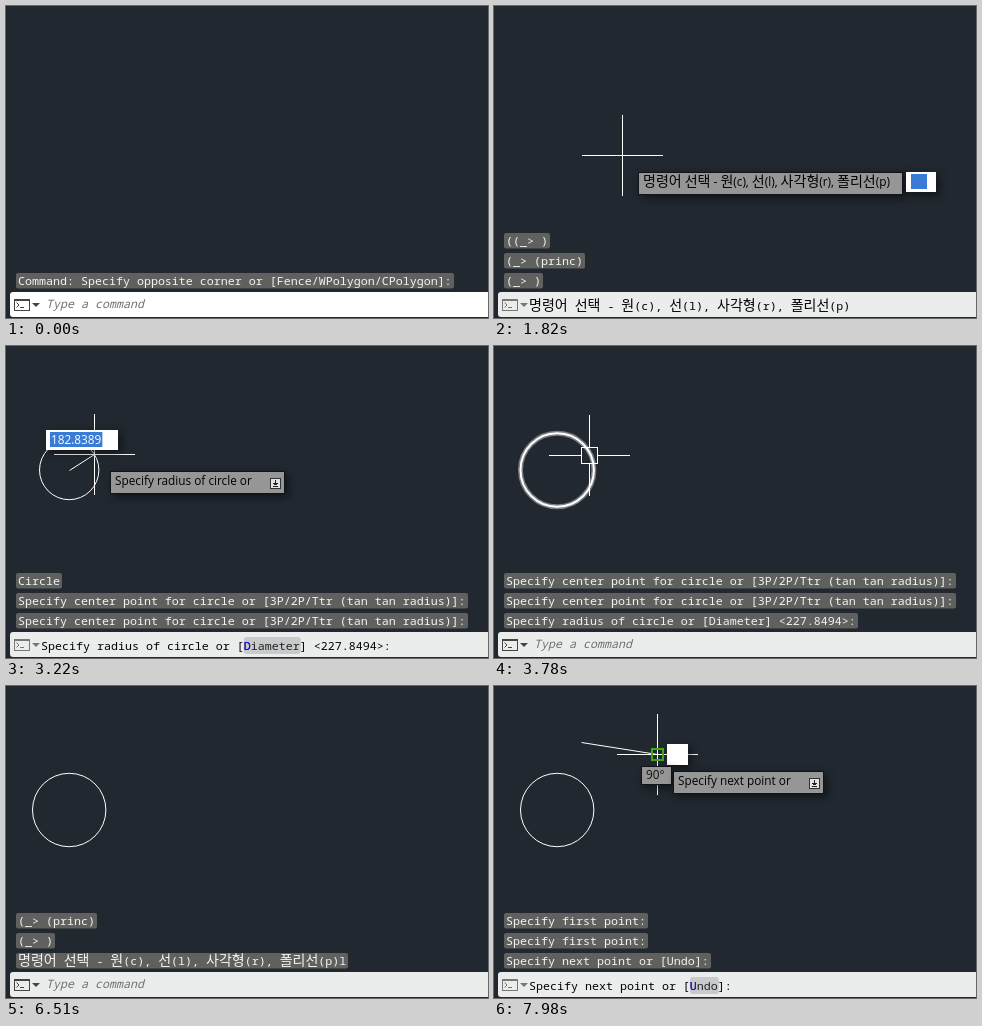
An HTML page with a canvas that plays this animation: 482x312 px, repeating every 8000 ms.

```html
<!DOCTYPE html>
<html lang="ko">
<head>
<meta charset="utf-8">
<style>
html, body { margin: 0; width: 100%; height: 100%; overflow: hidden; background: #212830; }
canvas { display: block; }
</style>
</head>
<body>
<canvas id="stage" width="482" height="312"></canvas>
<script>
const ctx = document.getElementById('stage').getContext('2d');
const LOOP = 8000, STEP = 70;
const MONO = '11.667px "Noto Sans Mono", monospace';
const SANS = '11.8px "Open Sans", sans-serif';
const HANGUL = '14px "Noto Sans CJK KR", "Noto Sans CJK", sans-serif';
const WHITE = '#fff', BLUE = '#3a7bd5', GREY = '#969696';

const IDLE = 'Type a command';
const MENU = '명령어 선택 - 원(c), 선(l), 사각형(r), 폴리선(p)';
const CENTER = 'Specify center point for circle or';
const RADIUS = 'Specify radius of circle or';
const FIRST = 'Specify first point:';
const NEXT = 'Specify next point or';
const CENTER_LOG = CENTER + ' [3P/2P/Ttr (tan tan radius)]:';

const circle = { x: 63, y: 124, r: 36.7 };
const lineStart = { x: 87, y: 56 }, lineEnd = { x: 163, y: 68 };
const UNITS = 6.16;

// Moments at which each command step takes over
const CENTER_CLICK = 2870, RADIUS_CLICK = 3430, LINE_CLICK = 7140, NEXT_CLICK = 7840;

const prompts = [
  [0, IDLE], [70, ''], [490, '(_> '], [980, MENU],
  [2520, IDLE], [2590, CENTER + ' [{3P} {2P} {Ttr (tan tan radius)}]:'],
  [CENTER_CLICK, RADIUS + ' [{Diameter}] <227.8494>:'],
  [RADIUS_CLICK, IDLE], [4480, ''], [4830, '(_> '], [5250, MENU],
  [6510, IDLE], [6580, FIRST], [LINE_CLICK, NEXT + ' [{Undo}]:']
];

const lispEcho = t => [
  [t, '(_> )'], [t, '((_> )'], [t, '((_> )']
];
const lispEnd = t => [[t, '((_> )'], [t, '(_> (princ)'], [t, '(_> )']];
const history = [
  [0, 'Command: Specify opposite corner or [Fence/WPolygon/CPolygon]:'],
  ...lispEcho(490), ...lispEnd(980),
  [2520, MENU + 'c'], [2590, 'Circle'], [2590, CENTER_LOG],
  [CENTER_CLICK, CENTER_LOG],
  [RADIUS_CLICK, RADIUS + ' [Diameter] <227.8494>:'],
  ...lispEcho(4830), ...lispEnd(5250),
  [6510, MENU + 'l'], [6580, 'Line'], [6580, FIRST],
  [LINE_CLICK, FIRST], [NEXT_CLICK, NEXT + ' [Undo]:']
];

// Pointer path: time, x, y
const path = [
  [1680, 141, 157], [1820, 128, 149], [2100, 77, 126], [2730, 77, 126],
  [2870, 63, 124], [3290, 93, 105], [3430, 93, 101], [3570, 94, 103],
  [3780, 95, 109], [3850, 90, 137], [4060, 67, 264], [4269, 67, 264],
  [4270, 67, 283], [5600, 67, 283], [5670, 75, 256], [5880, 102, 182],
  [6160, 134, 118], [6580, 134, 118], [7000, 92, 60], [7140, 87, 56],
  [7280, 92, 59], [7420, 114, 74], [7560, 140, 82], [7700, 163, 68],
  [8000, 163, 68]
];

const between = (t, a, b) => t >= a && t < b;

function pointerAt(t) {
  const i = Math.max(1, path.findIndex(p => p[0] > t));
  const [t0, x0, y0] = path[i - 1], [t1, x1, y1] = path[i];
  const k = Math.max(0, (t - t0) / (t1 - t0));
  return { x: Math.round(x0 + (x1 - x0) * k), y: Math.round(y0 + (y1 - y0) * k) };
}

function rect(x, y, w, h, color) {
  ctx.fillStyle = color;
  ctx.fillRect(x, y, w, h);
}

function rounded(x, y, w, h, r, color) {
  ctx.fillStyle = color;
  ctx.beginPath();
  ctx.roundRect(x, y, w, h, r);
  ctx.fill();
}

function frame(x, y, w, h, color, weight = 1) {
  ctx.strokeStyle = color;
  ctx.lineWidth = weight;
  ctx.strokeRect(x + weight / 2, y + weight / 2, w - weight, h - weight);
}

// Draws Latin and Hangul runs in their own fonts; returns the width.
function text(str, x, y, font, color, paint = true) {
  const start = x;
  ctx.fillStyle = color;
  for (const run of str.split(/([가-힣]+)/)) {
    ctx.font = /[가-힣]/.test(run) ? HANGUL : font;
    if (paint) ctx.fillText(run, x, y);
    x += ctx.measureText(run).width;
  }
  return x - start;
}

const widthOf = (str, font) => text(str, 0, 0, font, '#000', false);

function segment(a, b) {
  ctx.strokeStyle = WHITE;
  ctx.lineWidth = 1;
  ctx.beginPath();
  ctx.moveTo(a.x + .5, a.y + .5);
  ctx.lineTo(b.x + .5, b.y + .5);
  ctx.stroke();
}

function ring(r, color, weight) {
  ctx.strokeStyle = color;
  ctx.lineWidth = weight;
  ctx.beginPath();
  ctx.arc(circle.x + .2, circle.y, r, 0, Math.PI * 2);
  ctx.stroke();
}

function panel(x, y, w, h, color) {
  ctx.save();
  ctx.shadowColor = 'rgba(0,0,0,.5)';
  ctx.shadowBlur = 9;
  ctx.shadowOffsetX = ctx.shadowOffsetY = 3;
  rect(x, y, w, h, color);
  ctx.restore();
  if (color !== WHITE) frame(x, y, w, h, '#101317');
}

function field(x, y, value, selected) {
  panel(x, y, 72, 20, selected ? WHITE : GREY);
  if (selected) rect(x + 4, y + 2, widthOf(value, SANS) + 2, 15, BLUE);
  text(value, x + 5, y + 14, SANS, selected ? WHITE : '#111');
}

// Prompt label beside the pointer; returns the x of its right edge.
function label(p, str, hasMenu) {
  const x = p.x + 16, y = p.y + 17;
  const w = Math.round(widthOf(str, SANS) + (hasMenu ? 38 : 18));
  panel(x, y, w, 23, GREY);
  text(str, x + 5, y + 14, SANS, '#000');
  if (hasMenu) {
    const ix = x + w - 15, iy = y + 7;
    rect(ix, iy, 11, 11, '#e4e4e4');
    frame(ix, iy, 11, 11, '#333');
    rect(ix + 5, iy + 2, 1, 5, '#222');
    rect(ix + 3, iy + 5, 5, 1, '#222');
    rect(ix + 4, iy + 6, 3, 1, '#222');
    rect(ix + 3, iy + 8, 5, 1, '#222');
  }
  return x + w;
}

function coordinates(p, x) {
  const y = p.y + 17;
  field(x + 4, y, (1677.6827 + (p.x - 77) * UNITS).toFixed(4), true);
  field(x + 80, y, (1179.5252 - (p.y - 126) * UNITS).toFixed(4), false);
}

function angleBox(x, y, degrees) {
  const str = degrees + '°';
  panel(x, y, Math.round(widthOf(str, SANS)) + 12, 19, GREY);
  text(str, x + 5, y + 13, SANS, '#111');
}

function distanceField(a, b, dx, dy) {
  const d = Math.hypot(b.x - a.x, b.y - a.y) * UNITS;
  field(Math.round((a.x + b.x) / 2 + dx), Math.round((a.y + b.y) / 2 + dy), d.toFixed(4), true);
}

function crosshair(p, picking) {
  if (picking) {
    rect(p.x - 40, p.y, 32, 1, WHITE);
    rect(p.x + 9, p.y, 32, 1, WHITE);
    rect(p.x, p.y - 40, 1, 32, WHITE);
    rect(p.x, p.y + 9, 1, 32, WHITE);
    frame(p.x - 8, p.y - 8, 17, 17, WHITE);
  } else {
    rect(p.x - 40, p.y, 81, 1, WHITE);
    rect(p.x, p.y - 40, 1, 81, WHITE);
  }
}

function drawing(t, p) {
  if (between(t, CENTER_CLICK, RADIUS_CLICK)) {
    ring(Math.hypot(p.x - circle.x, p.y - circle.y), WHITE, 1);
    segment(circle, p);
  } else if (t >= RADIUS_CLICK) {
    const gap = Math.abs(Math.hypot(p.x - circle.x, p.y - circle.y) - circle.r);
    const hovered = t < 4270 && gap < 8;
    if (hovered) ring(circle.r, '#7b7e82', 5);
    ring(circle.r, WHITE, hovered ? 2 : 1);
  }
  if (t >= LINE_CLICK) segment(lineStart, t < NEXT_CLICK ? p : lineEnd);
}

function tooltips(t, p) {
  if (between(t, 1680, 2520) || between(t, 5670, 6510)) {
    const x = label(p, MENU, false) + 3, y = p.y + 17;
    const typed = between(t, 2240, 2520) ? 'c' : between(t, 6230, 6510) ? 'l' : '';
    panel(x, y, 30, 20, WHITE);
    if (typed) text(typed, x + 5, y + 14, SANS, '#000');
    else rect(x + 5, y + 2, 16, 15, BLUE);
  } else if (between(t, 2590, CENTER_CLICK)) {
    coordinates(p, label(p, CENTER, true));
  } else if (between(t, CENTER_CLICK, RADIUS_CLICK)) {
    distanceField(circle, p, -36, -32);
    label(p, RADIUS, true);
  } else if (between(t, 6580, LINE_CLICK)) {
    coordinates(p, label(p, FIRST, false));
  } else if (between(t, LINE_CLICK, NEXT_CLICK)) {
    const dx = p.x - lineStart.x, dy = p.y - lineStart.y;
    distanceField(lineStart, p, -36, 12);
    angleBox(p.x + 4, Math.round(p.y - dy / 2 - 8), Math.round(Math.abs(Math.atan2(dy, dx)) * 180 / Math.PI));
    label(p, NEXT, true);
  } else if (t >= NEXT_CLICK) {
    if (t >= 7910) frame(p.x - 6, p.y - 6, 13, 13, '#3fae10', 2);
    panel(p.x + 10, p.y - 10, 21, 21, WHITE);
    angleBox(p.x - 16, p.y + 12, 90);
    label(p, NEXT, true);
  }
}

function log(t) {
  const rows = history.filter(h => h[0] <= t).slice(-3);
  rows.forEach(([, str], i) => {
    const y = 267 - 20 * (rows.length - 1 - i);
    rounded(10, y, Math.round(widthOf(str, MONO)) + 4, 15.5, 2, '#60605f');
    text(str, 12, y + 12, MONO, '#f4f4f4');
  });
}

function commandBar(t) {
  const focused = t < 1540 || between(t, 4270, 5670);
  const prompt = prompts.filter(e => e[0] <= t).pop()[1];
  const idle = prompt === IDLE;
  const ink = idle ? '#444' : '#777';
  rounded(4, 286, 482, 25, 3, focused ? WHITE : '#ebecec');

  frame(8, 293, 16, 12, ink);
  rect(8, 293, 16, 2, ink);
  ctx.strokeStyle = ink;
  ctx.beginPath();
  ctx.moveTo(10.5, 296.5);
  ctx.lineTo(13, 299);
  ctx.lineTo(10.5, 301.5);
  ctx.stroke();
  rect(14, 301, 4, 1, ink);
  ctx.fillStyle = ink;
  ctx.beginPath();
  ctx.moveTo(26, 297);
  ctx.lineTo(34, 297);
  ctx.lineTo(30, 301);
  ctx.fill();

  if (idle) {
    text(IDLE, 40, 302, 'italic ' + MONO, '#707070');
    return;
  }
  let x = 35;
  prompt.split(/[{}]/).forEach((part, i) => {
    if (i % 2) {
      const w = widthOf(part, MONO), key = part.match(/^(\d?[A-Z])/)[0];
      rounded(x, 291, w + 1, 17, 3, '#c9cacb');
      text(part, x, 304, MONO, '#222');
      text(key, x, 304, MONO, '#1010f0');
      x += w;
    } else {
      x += text(part, x, 304, MONO, '#000');
    }
  });
  if (prompt === '') rect(37, 292, 1, 15, '#000');
  if (between(t, 5250, 5670)) rect(367, 292, 1, 15, '#000');
}

function render(t) {
  const p = pointerAt(t);
  rect(0, 0, 482, 312, '#212830');
  drawing(t, p);
  if (t >= 1680 && !between(t, 2520, 2590) && !between(t, 6510, 6580)) {
    crosshair(p, between(t, RADIUS_CLICK, 4830));
  }
  log(t);
  commandBar(t);
  tooltips(t, p);
}

const begin = performance.now();
function tick() {
  const ms = (performance.now() - begin) % LOOP;
  render(Math.floor(ms / STEP) * STEP);
  requestAnimationFrame(tick);
}
tick();
</script>
</body>
</html>
```
